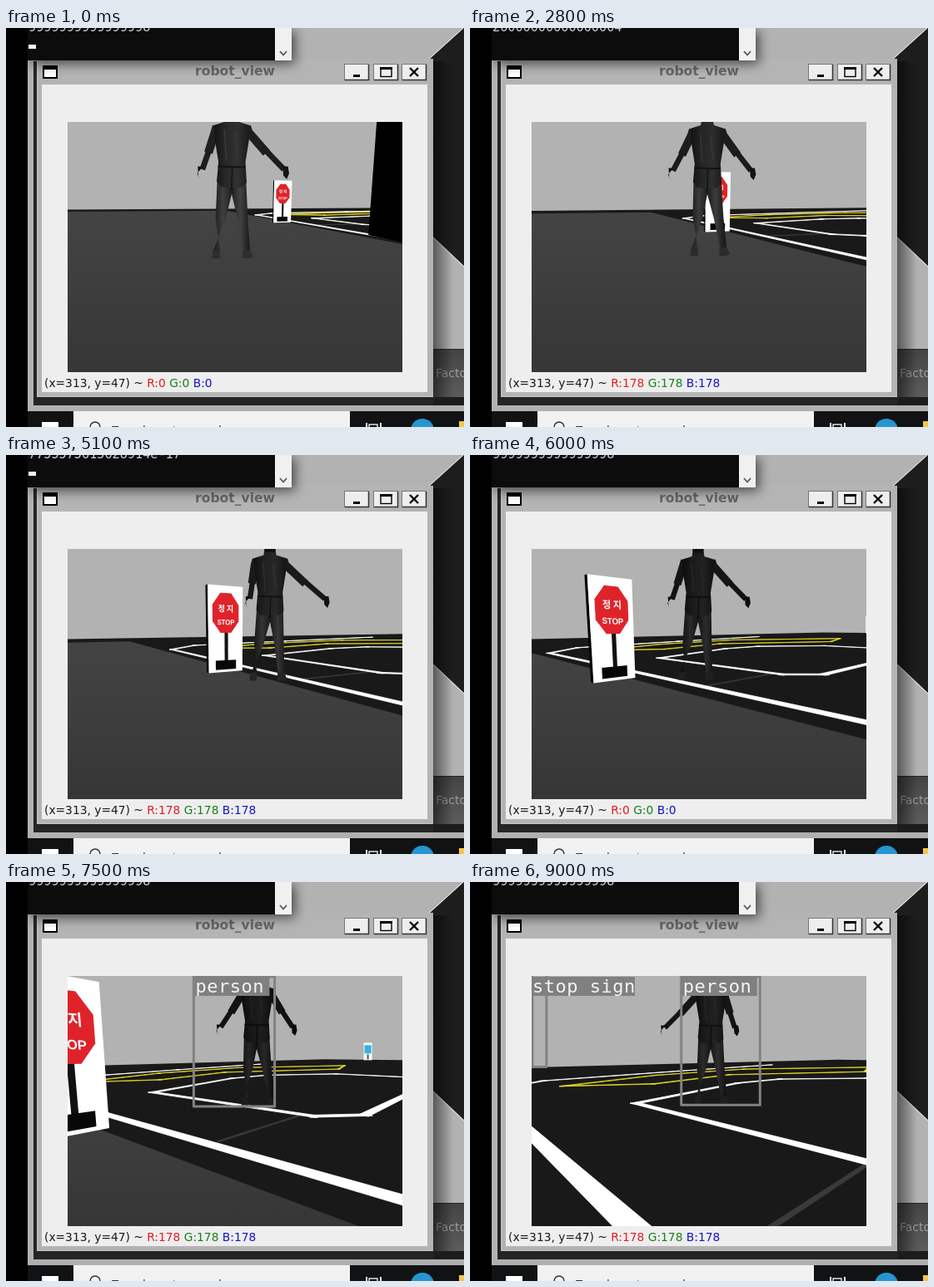
Animation, 550 px wide and 480 px high, one loop 9.1 s. Source, as an HTML page with a canvas:

```html
<!DOCTYPE html>
<html lang="en">
<head>
<meta charset="utf-8">
<title>Robot view</title>
<style>
html, body { margin: 0; width: 100%; height: 100%; overflow: hidden; background: #000; }
canvas { display: block; width: 550px; height: 480px; }
</style>
</head>
<body>
<canvas id="stage" width="550" height="480"></canvas>
<script>
const g = document.getElementById('stage').getContext('2d');
const LOOP = 9.1, STEP = .1;
const SANS = '"DejaVu Sans", sans-serif';
const MONO = '"DejaVu Sans Mono", monospace';

// Camera: focal length, screen centre, vanishing line, downward tilt.
// World units are camera heights: e runs along the road edge, n across it.
const FOCAL = 350, MID = 275, EYE = 208, TILT = .157, NEAR = .3;

// Robot drive: time, e, n, heading in degrees, turn of the walker
const DRIVE = [
  [0, 15.6, -5.64, 78.5, .2], [1.8, 13.1, -4.73, 75, .04], [3.8, 10.3, -3.86, 69.5, .13],
  [5.1, 8.8, -3.76, 62, .33], [6.8, 7.34, -3.05, 35, .1], [8.2, 6.16, -1.5, 47, -.1],
  [9, 5.4, -.82, 49, -.22]];
// Walker on screen: time, x
const SWAY = [[0, 271], [1.8, 279], [3.8, 291], [5.1, 317], [5.4, 316], [6.7, 225],
  [6.8, 236], [7.5, 301], [8.2, 292], [9, 289]];
const OUTER = [[40,0], [-4.5,0], [-7,2], [-9,10], [-12,24]];
const INNER = [[4.6,2.15], [0,2.15], [-1.5,7], [-1.5,9.6], [.7,12.8], [5.2,12.6], [5.2,2.8], [4.6,2.15]];
const YELLOW = [[-4.5,2], [-6.8,7], [-8,15], [-3.4,25], [-1.2,18], [-4.7,10], [-3.2,4.6], [-4.5,2]];
const PERSON_SEEN = [[.9, 2.5], [3.2, 4.5], [6.2, 9.1]];
const SIGN_SEEN = [[1.2, 2.3], [3.3, 4.4], [6.4, 7.5], [8.7, 9.1]];
const OUTPUT = [[0, '9999999999999998'], [.5, '0000000000000003'], [1.5, '9999999999999998'],
  [2.6, '20000000000000004'], [4.6, '7755575615628914e-17'], [5.7, '9999999999999998']];

function sample(rows, t) {
  let i = 0;
  while (i < rows.length - 2 && t >= rows[i + 1][0]) i++;
  const a = rows[i], b = rows[i + 1];
  const u = Math.max(0, Math.min(1, (t - a[0]) / (b[0] - a[0])));
  return a.slice(1).map((v, j) => v + (b[j + 1] - v) * u);
}
const seen = (spans, t) => spans.some(([a, b]) => t >= a && t < b);
const gray = v => `rgb(${v},${v},${v})`;

function rect(x, y, w, h, color) { g.fillStyle = color; g.fillRect(x, y, w, h); }
function trace(points) {
  g.beginPath();
  for (const [x, y] of points) g.lineTo(x, y);
  g.closePath();
}
function poly(points, color) { trace(points); g.fillStyle = color; g.fill(); }
function line(p, color, width) {
  g.beginPath();
  for (let i = 0; i < p.length; i += 2) g.lineTo(p[i], p[i + 1]);
  g.strokeStyle = color; g.lineWidth = width; g.stroke();
}
function frame(x, y, w, h, color, width) {
  g.strokeStyle = color; g.lineWidth = width; g.strokeRect(x, y, w, h);
}
function text(s, x, y, font, color, align = 'left') {
  g.font = font; g.fillStyle = color; g.textAlign = align; g.fillText(s, x, y);
}
function shade(x0, y0, x1, y1, ...colors) {
  const s = g.createLinearGradient(x0, y0, x1, y1);
  colors.forEach((c, i) => s.addColorStop(i / (colors.length - 1), c));
  return s;
}
function raised(x, y, w, h, color) {
  g.save();
  g.shadowColor = 'rgba(0,0,0,.6)'; g.shadowBlur = 14;
  g.shadowOffsetX = 4; g.shadowOffsetY = 4;
  rect(x, y, w, h, color);
  g.restore();
}

function view(t) {
  const [ce, cn, deg] = sample(DRIVE, t);
  const c = Math.cos(deg * Math.PI / 180), s = Math.sin(deg * Math.PI / 180);
  const local = ([e, n]) => [(e - ce) * c + (n - cn) * s, (n - cn) * c - (e - ce) * s];
  const toScreen = ([x, z], up = 0) => {
    const d = Math.max(NEAR, z - TILT * up);
    return [MID + FOCAL * x / d, EYE + FOCAL * (1 - up) / d];
  };
  const project = (e, n, up) => toScreen(local([e, n]), up);
  // Ground polygon, cut at the near plane
  const floor = points => {
    const p = points.map(local), out = [];
    p.forEach((a, i) => {
      const b = p[(i + 1) % p.length];
      if (a[1] >= NEAR) out.push(toScreen(a));
      if ((a[1] >= NEAR) !== (b[1] >= NEAR)) {
        const u = (NEAR - a[1]) / (b[1] - a[1]);
        out.push(toScreen([a[0] + (b[0] - a[0]) * u, NEAR]));
      }
    });
    return out;
  };
  return { project, floor, deg };
}

function desktop() {
  rect(0, 0, 550, 480, '#000');
  rect(26, 0, 524, 461, '#b2b2b2');
  poly([[550,0], [508,38], [513,40], [513,252], [550,287]], '#1d1d1d');
  line([549,0, 508,37], '#e8e8e8', 1);
  line([513,252, 550,287], '#dedede', 1.2);
  rect(513, 386, 37, 60, shade(0, 386, 0, 444, '#444', '#5c5c5c'));
  line([513,386.5, 550,386.5], '#262626', 1);
  text('Factory', 516, 420, '14px ' + SANS, '#9c9c9c');
  rect(33, 40, 480, 414, '#252525');
  rect(513, 444, 37, 10, '#1c1c1c');
  rect(513, 40, 24, 404, shade(513, 0, 537, 0, 'rgba(0,0,0,.5)', 'rgba(0,0,0,0)'));
  rect(26, 454, 524, 7, '#b0b0b0');

  rect(26, 461, 524, 19, '#101214');
  rect(43, 474, 20, 6, '#fff');
  rect(81, 461, 332, 19, '#f2f2f2');
  g.beginPath(); g.arc(107, 480, 6, 0, 7);
  g.strokeStyle = '#333'; g.lineWidth = 1.5; g.stroke();
  text('Type here to search', 127, 489, '15px "Open Sans", sans-serif', '#333');
  frame(436, 477, 10, 8, '#eee', 1.4);
  rect(432, 475, 2, 5, '#eee');
  rect(449, 475, 2, 5, '#eee');
  g.beginPath(); g.arc(500, 484, 14, 0, 7);
  g.fillStyle = '#2596d1'; g.fill();
  rect(544, 473, 6, 7, '#f4c542');
}

function terminal(t) {
  raised(26, 0, 317, 39, '#0c0c0c');
  text(OUTPUT.filter(o => o[0] <= t).pop()[1], 27, 4, '15.2px ' + MONO, '#ccc');
  if (Math.cos(t / .366 * 2 * Math.PI) > 0) rect(27, 20, 9, 5, '#f2f2f2');
  rect(323, 0, 20, 39, '#f0f0f0');
  line([329,28, 333,32.5, 337,28], '#555', 1.8);
}

function windowFrame(status) {
  rect(37, 37, 476, 407, '#b4b4b4');
  rect(43, 68, 463, 370, '#eee');
  line([37.5,40, 37.5,443.5, 513,443.5], '#c8c8c8', 1);
  text('robot_view', 275, 57, 'bold 15.6px ' + SANS, '#656565', 'center');
  rect(44, 45, 18, 16, '#000');
  rect(46, 50, 14, 9, '#fff');
  for (const x of [406, 441, 475]) {
    rect(x, 43, 30, 20, '#eee');
    frame(x + .5, 43.5, 29, 19, '#777', 1);
    line([x + 1,62.5, x + 29.5,62.5, x + 29.5,44], '#333', 1.5);
  }
  rect(417, 56, 8, 3, '#000');
  frame(450, 48.5, 13, 10, '#000', 1.4);
  rect(449, 47, 15, 3, '#000');
  line([485,48, 495,58], '#000', 2.4);
  line([495,48, 485,58], '#000', 2.4);

  let x = 46;
  for (const [s, c] of [['(x=313, y=47) ~ ', '#1a1a1a'], [`R:${status} `, '#e02020'],
    [`G:${status} `, '#188018'], [`B:${status}`, '#1515c8']]) {
    text(s, x, 432, '13.8px ' + SANS, c);
    x += g.measureText(s).width;
  }
}

function stripe(cam, points, color, width = .17) {
  for (let i = 1; i < points.length; i++) {
    const [a, b] = [points[i - 1], points[i]];
    const d = Math.hypot(b[0] - a[0], b[1] - a[1]);
    const ue = (b[0] - a[0]) / d * width / 2, un = (b[1] - a[1]) / d * width / 2;
    const quad = cam.floor([
      [a[0] - ue - un, a[1] - un + ue], [b[0] + ue - un, b[1] + un + ue],
      [b[0] + ue + un, b[1] + un - ue], [a[0] - ue + un, a[1] - un - ue]]);
    poly(quad, color);
    g.strokeStyle = color; g.lineWidth = .8; g.stroke();
  }
}
const area = (e0, e1, n0, n1) => [[e0, n0], [e1, n0], [e1, n1], [e0, n1]];

function scenery(cam) {
  rect(74, 113, 402, 301, '#b2b2b2');
  poly(cam.floor(area(-21, 40, -60, 60)), '#191919');
  poly(cam.floor(area(-14, 40, -60, -.52)), shade(0, 218, 0, 414, '#444', '#363636'));
  stripe(cam, [[4.4, .15], [4.4, 2.1]], '#3a3a3a', .04);
  stripe(cam, YELLOW, '#e6dc20', .14);
  stripe(cam, OUTER, '#fff');
  stripe(cam, INNER, '#fff');
  const p = cam.project;
  poly([p(8, -.1, 8), p(11.5, -.5, 8), p(11.5, -.5, 0), p(8, -.1, 0)], '#000');
  const [bx, by] = p(-10.5, 56, 0);
  rect(bx - 5, by - 21, 10, 21, '#f4f8fa');
  rect(bx - 4, by - 18, 8, 10, '#35b4e0');
  rect(bx - 1, by - 7, 2, 6, '#555');
}

// Board point: u from left to right, v from top to bottom
const onSign = (cam, u, v, back = 0) => cam.project(2.85 - back, -1.25 + .85 * u, 1.92 * (1 - v));
function octagon(cam) {
  return Array.from({ length: 8 }, (_, i) => {
    const a = (i + .5) * Math.PI / 4;
    return onSign(cam, .5 + .41 * Math.cos(a), .31 + .245 * Math.sin(a));
  });
}
function stopSign(cam) {
  const at = (u, v, back) => onSign(cam, u, v, back);
  const block = (u, v, w, h, c) =>
    poly([at(u, v), at(u + w, v), at(u + w, v + h), at(u, v + h)], c);
  poly([at(0, 0, .12), at(0, 0), at(0, 1), at(0, 1, .12)], '#000');
  block(0, 0, 1, 1, '#fff');
  block(.46, .53, .1, .37, '#111');
  block(.2, .86, .6, .11, '#080808');
  poly(octagon(cam), '#e0232b');
  const [x, y] = at(.5, .31), [ux, uy] = at(.9, .31), [vx, vy] = at(.5, .55);
  g.save();
  g.transform((ux - x) / 40, (uy - y) / 40, (vx - x) / 54, (vy - y) / 54, x, y);
  text('정 지', 0, -4, 'bold 22px "Noto Sans CJK KR", "Noto Sans CJK", sans-serif', '#fff', 'center');
  text('STOP', 0, 30, 'bold 19px "Liberation Sans", sans-serif', '#fff', 'center');
  g.restore();
}

// The walker slowly gains distance; size is feet below the vanishing line
const walkerSize = t => 69 - 1.1 * t;

function person(t, deg) {
  const turn = sample(DRIVE, t)[3], step = Math.sin(t * 7), light = 10 + .6 * deg;
  const tone = f => gray(Math.round(light * f));
  const pants = shade(-.3, 0, .3, 0, tone(.5), tone(1.1), tone(.55), tone(1.15), tone(.5));
  g.save();
  g.translate(sample(SWAY, t)[0], EYE);
  g.scale(walkerSize(t), walkerSize(t));
  for (const s of [-1, 1]) {
    const foot = s * .26 + .05 * step, knee = s * .19 + .02 * step;
    poly([[s * .25,-.38], [knee + s * .09,.3], [foot + .06,.87], [foot - .06,.87],
      [knee - s * .09,.3], [0,-.12], [-s * .02,-.38]], pants);
    poly([[foot - .07,.85], [foot + .06,.85], [foot + s * .03 + .08,.97],
      [foot + .06,1], [foot - .08,1]], tone(.8));

    const hand = s * .74 + turn, elbow = s * .27 + (hand - s * .27) * .5;
    line([s * .26,-1.3, s * .29,-1.2, elbow,-.84], tone(.55), .15);
    line([elbow - s * .01,-.88, hand - s * .03,-.55], tone(.5), .1);
    poly([[hand - .05,-.6], [hand + .04,-.6], [hand + s * .06,-.48],
      [hand + s * .02,-.38], [hand - .04,-.44]], tone(.35));
  }
  poly([[-.1,-1.5], [.1,-1.5], [.12,-1.38], [.31,-1.32], [.3,-1.05], [.24,-.68], [.26,-.32],
    [.18,-.24], [-.18,-.24], [-.26,-.34], [-.23,-.68], [-.29,-1.05], [-.31,-1.32], [-.12,-1.38]],
    shade(-.3, 0, .3, 0, tone(.35), tone(.7), tone(.85), tone(.45)));
  poly([[-.14,-1.8], [.14,-1.8], [.1,-1.44], [-.1,-1.44]], '#111');
  line([-.24,-.6, .24,-.59], tone(.3), .025);
  line([-.13,-1.25, -.09,-.7], tone(.95), .03);
  line([.06,-1.2, .11,-.75], tone(.95), .04);
  line([.01,-.58, 0,-.2], tone(.35), .025);
  g.restore();
}

function label(s, x, y, w) {
  rect(x, y, w, 23, '#808080');
  g.letterSpacing = '.5px';
  text(s, x + 1, y + 19, '22px ' + MONO, '#f4f4f4');
  g.letterSpacing = '0px';
}
// Detections trail behind the picture
function detections(t) {
  if (seen(PERSON_SEEN, t)) {
    const k = walkerSize(t), x = sample(SWAY, t - 1.5)[0] - .8 * k;
    frame(x, 114, 1.6 * k, EYE + 1.02 * k - 114, '#828282', 3);
    label('person', x + 1, 114, 90);
  }
  if (seen(SIGN_SEEN, t)) {
    const p = octagon(view(t - .8)), xs = p.map(q => q[0]), ys = p.map(q => q[1]);
    const x = Math.max(75, Math.min(...xs)), y = Math.min(...ys);
    frame(x, y, Math.max(14, Math.max(...xs) - x), Math.max(...ys) - y, '#828282', 3);
    label('stop sign', x - 1, Math.max(114, y - 23), 124);
  }
}

function draw(t) {
  const cam = view(t);
  desktop();
  windowFrame(Math.abs(sample(SWAY, t)[0] - 270) < 13 ? 0 : 178);
  terminal(t);
  g.save();
  g.beginPath();
  g.rect(74, 113, 402, 301);
  g.clip();
  g.lineJoin = 'round';
  scenery(cam);
  stopSign(cam);
  person(t, cam.deg);
  detections(t);
  g.restore();
}

const start = performance.now();
function tick() {
  const t = (performance.now() - start) / 1000 % LOOP;
  draw(Math.floor(t / STEP) * STEP);
  requestAnimationFrame(tick);
}
tick();
</script>
</body>
</html>
```
